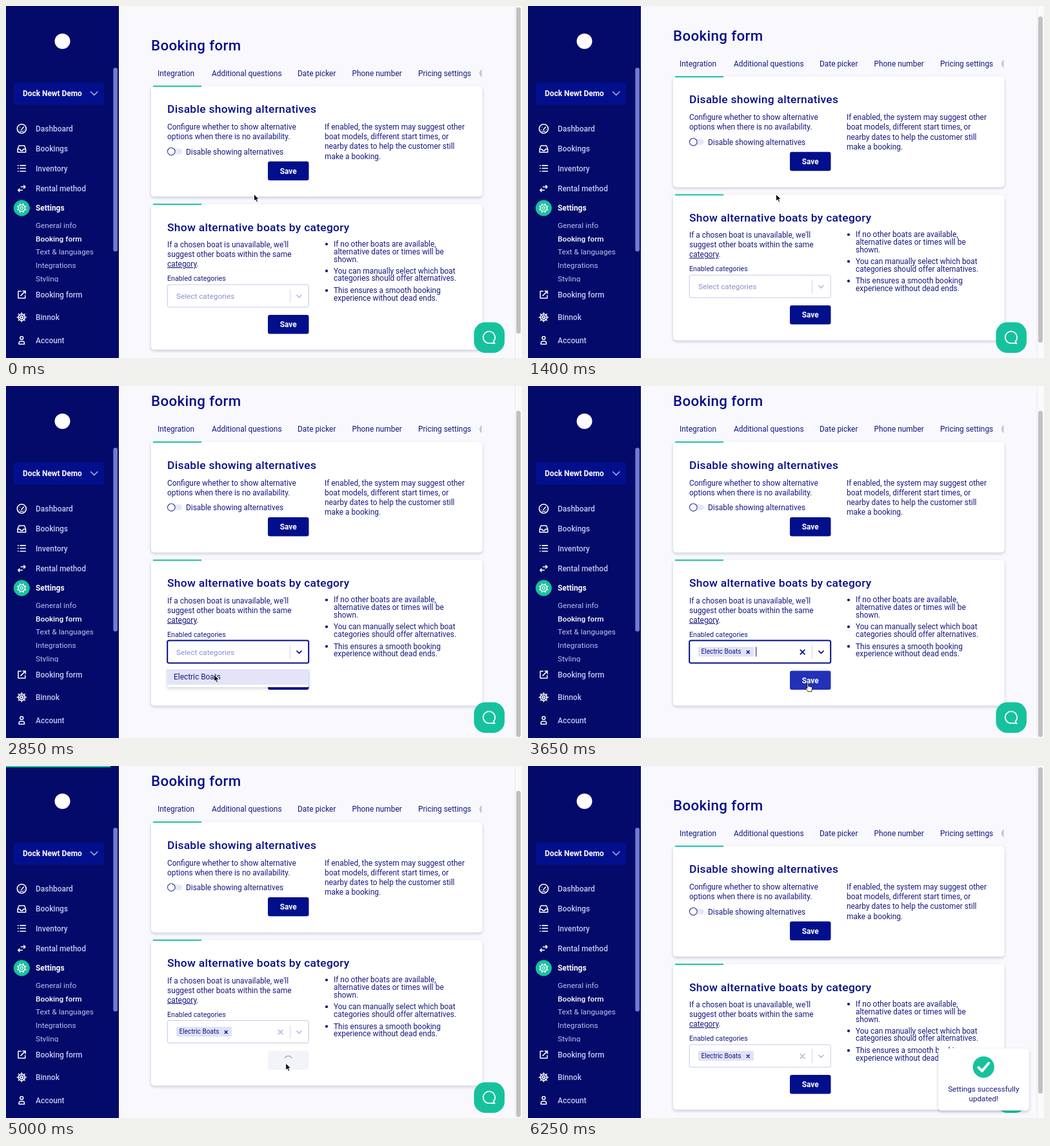
An HTML page for the animation above (6.3 s loop, 800 by 547 pixels).

```html
<!DOCTYPE html>
<html lang="en">
<head>
<meta charset="utf-8">
<title>Booking form settings</title>
<style>
  html, body { margin: 0; width: 100%; height: 100%; overflow: hidden; background: #f8f8fd; }
  svg { display: block; width: 800px; height: 547px; font-family: Roboto, "Noto Sans", sans-serif; }
  text { font-size: 11.9px; fill: #151a80; }
  .title { font-size: 22.3px; font-weight: 500; letter-spacing: .35px; fill: #060f88; }
  .head { font-size: 17.4px; font-weight: 500; letter-spacing: .29px; fill: #060f88; }
  .label { font-size: 10.7px; }
  .chip { font-size: 10.15px; }
  .hint { font-size: 11.75px; fill: #8b90cf; }
  .btn { font-size: 11.9px; font-weight: 700; fill: #fff; text-anchor: middle; }
  .mid { font-size: 11.7px; text-anchor: middle; }
  .nav { font-size: 11.95px; font-weight: 500; fill: #c3c7ee; }
  .sub { font-size: 11.8px; fill: #bbbfee; }
  .on { font-weight: 500; fill: #fff; }
  .bold { font-weight: 700; fill: #fff; }
  .line { fill: none; stroke-linecap: round; stroke-linejoin: round; }
</style>
</head>
<body>
<svg id="stage" viewBox="0 0 800 547">
  <defs>
    <filter id="soft" x="-10%" y="-15%" width="120%" height="135%">
      <feDropShadow dx="0" dy="2" stdDeviation="2.2" flood-color="#25284f" flood-opacity=".22"/>
    </filter>
    <clipPath id="tabClip"><rect x="225" y="90" width="512.5" height="30"/></clipPath>
    <clipPath id="subClip"><rect x="40" y="330" width="120" height="98.5"/></clipPath>
  </defs>
  <rect width="800" height="547" fill="#f8f8fd"/>
  <g id="page"></g>
  <g id="side"></g>
  <rect x="789" width="11" height="547" fill="#fafafb"/>
  <path d="M789.5 0V547" stroke="#e8e8ee"/>
  <rect id="thumb" x="791" width="7" height="507" rx="3.5" fill="#c1c1c3"/>
  <g id="chat">
    <rect x="725.5" y="491.5" width="47.5" height="47.5" rx="17.5" fill="#16c29d"/>
    <path class="line" stroke="#fff" stroke-width="1.7"
      d="M755.6 521.4A9.2 9.2 0 1 0 751.5 523.8Q755 524.2 757.8 524.4Q756.2 523 755.6 521.4Z"/>
  </g>
  <g id="toast"></g>
  <rect id="bar" height="2" fill="#16c8a2"/>
  <g id="cursor">
    <path id="arrow" d="M0 0V10.6L2.5 8.4L4.2 12.2L6.1 11.4L4.4 7.7H7.7Z"
      fill="#000" stroke="#fff" stroke-width=".9" stroke-linejoin="round"/>
    <path id="hand" fill="#fff" stroke="#111" stroke-width=".9" stroke-linejoin="round"
      d="M-.9 .6Q0 -.8 1 .6V5Q2 4 3 5.2Q4.1 4.4 5 5.7Q6.3 5.2 6.7 6.6V9.2Q6.5 11 5.6 12.8H.3Q-.6 11-2.8 8.2Q-3.2 6.7-1.9 7L-.9 8Z"/>
  </g>
</svg>
<script>
const LOOP = 6300, STEP = 50, MAX_SCROLL = 37.5;
const NAVY = '#020f8c', GREEN = '#16c29d', PALE = '#b9bde0';
const $ = id => document.getElementById(id);
const set = (id, attrs) => { for (const k in attrs) $(id).setAttribute(k, attrs[k]); };
const show = (id, on) => set(id, { visibility: on ? 'visible' : 'hidden' });

const text = (x, y, s, cls = '') => `<text x="${x}" y="${y}" class="${cls}">${s}</text>`;
const lines = (x, y, gap, rows, cls) => rows.map((s, i) => text(x, y + i * gap, s, cls)).join('');
const rect = (x, y, w, h, r, fill, more = '') =>
  `<rect x="${x}" y="${y}" width="${w}" height="${h}" rx="${r}" fill="${fill}" ${more}/>`;
const circle = (x, y, r, fill, more = '') => `<circle cx="${x}" cy="${y}" r="${r}" fill="${fill}" ${more}/>`;
const line = (d, stroke, w, more = '') => `<path class="line" d="${d}" stroke="${stroke}" stroke-width="${w}" ${more}/>`;
const cross = (x, y, r) => `M${x - r} ${y - r}L${x + r} ${y + r}M${x + r} ${y - r}L${x - r} ${y + r}`;
const card = (y, h) => rect(225, y, 513.5, h, 5, '#fff', 'filter="url(#soft)"') + rect(228, y - .8, 75, 2, 0, GREEN);
const spokes = (n, r1, r2, turn = 0) => Array.from({ length: n }, (_, i) => {
  const a = (i + turn) * 2 * Math.PI / n, c = Math.cos(a), s = Math.sin(a);
  return `M${c * r1} ${s * r1}L${c * r2} ${s * r2}`;
}).join('');

function buildPage() {
  const tabs = [[235, 'Integration'], [319, 'Additional questions'], [452, 'Date picker'],
    [536.5, 'Phone number'], [639, 'Pricing settings']];
  const notes = [
    [370, ['If no other boats are available,', 'alternative dates or times will be', 'shown.']],
    [411.7, ['You can manually select which boat', 'categories should offer alternatives.']],
    [442.2, ['This ensures a smooth booking', 'experience without dead ends.']]];
  $('page').innerHTML =
    text(225, 68.7, 'Booking form', 'title') +
    tabs.map(([x, s]) => text(x, 108.7, s)).join('') +
    `<g clip-path="url(#tabClip)">${circle(741, 104.5, 7, '#c3c4da')}</g>` +
    card(124.5, 171.5) +
    text(250, 166, 'Disable showing alternatives', 'head') +
    lines(250, 192, 15.2, ['Configure whether to show alternative', 'options when there is no availability.']) +
    lines(494, 192, 15.2, ['If enabled, the system may suggest other', 'boat models, different start times, or',
      'nearby dates to help the customer still', 'make a booking.']) +
    rect(252, 221.8, 21, 8.6, 4.3, '#e5e6f7') +
    circle(256.3, 226.1, 5.8, '#fff', 'stroke="#2d339a" stroke-width="1.1"') +
    text(279, 230.6, 'Disable showing alternatives') +
    rect(406, 241.5, 63.5, 29.5, 3, NAVY) + text(437.7, 260.5, 'Save', 'btn') +
    card(308, 226) +
    text(250, 349.5, 'Show alternative boats by category', 'head') +
    lines(250, 375, 15, ["If a chosen boat is unavailable, we'll", 'suggest other boats within the same',
      '<tspan text-decoration="underline">category</tspan>.']) +
    notes.map(([y, rows]) => circle(497, y, 2.1, '#0c1078') + lines(508, y + 3.8, 11.9, rows)).join('') +
    text(250, 427, 'Enabled categories', 'label') +
    '<rect id="field" x="250.2" y="433" width="219" height="35" rx="2.5" fill="#fff"/>' +
    text(264, 455, '<tspan id="hint">Select categories</tspan>', 'hint') +
    line('M440.5 440.5V461', '#d3d5ea', 1) +
    line('M451 449.3L454.5 452.8L458 449.3', PALE, 1.7, 'id="open"') +
    '<g id="chip">' + rect(264, 442.7, 86, 15.3, 2, '#e0e2f7') + text(268.5, 453.7, 'Electric Boats', 'chip') +
      line(cross(341.2, 451, 2), NAVY, 1.5) + line(cross(425.6, 451, 3.3), PALE, 1.7, 'id="clear"') + '</g>' +
    '<path id="caret" d="M353.7 443V458" stroke="#111550"/>' +
    rect(406, 480, 63.5, 29.5, 3, NAVY, 'id="save"') +
    `<g id="saveText">${text(437.7, 499, 'Save', 'btn')}</g>` +
    line('M432.3 491A6.2 6.2 0 0 1 443 491.4', '#b4b6c2', 1.6, 'id="spin"') +
    '<g id="menu">' + rect(250, 474.3, 219.5, 31.2, 2, '#fff', 'filter="url(#soft)"') +
      rect(250, 477.5, 219.5, 24.3, 0, '#e3e4f8') + text(260, 493.9, 'Electric Boats') + '</g>';
}

function buildSide() {
  const nav = [[195, 'Dashboard'], [226.2, 'Bookings'], [256.7, 'Inventory'], [287.7, 'Rental method'],
    [452.5, 'Booking form'], [487.7, 'Binnok'], [523.7, 'Account']];
  const subs = ['General info', 'Booking form', 'Text &amp; languages', 'Integrations', 'Styling'];
  const icon = (y, body) => `<g transform="translate(24.3 ${y})">${body}</g>`;
  const white = (d, w = 1.5) => line(d, '#fff', w);
  const ring = (r, w) => circle(0, 0, r, 'none', `stroke="#fff" stroke-width="${w}"`);
  $('side').innerHTML =
    rect(0, 0, 175, 547, 0, '#040a69') +
    rect(166.3, 96, 6.6, 285.5, 3.3, '#737bd0') +
    circle(87.5, 54.7, 12, '#fff') +
    rect(12, 119, 140, 34.3, 2, NAVY) +
    text(26, 140.2, 'Dock Newt Demo', 'bold') +
    line('M131.5 133.3L136.7 138.5L141.9 133.3', '#b1b6ea', 1.5) +
    nav.map(([y, s]) => text(46, y, s, 'nav')).join('') +
    text(46, 318.3, 'Settings', 'bold') +
    '<g clip-path="url(#subClip)">' +
      subs.map((s, i) => text(46, 344.9 + i * 20.75, s, i === 1 ? 'sub on' : 'sub')).join('') + '</g>' +
    icon(190.7, ring(7, 1.6) + white('M-.5 1.5L3 -2.6', 1.6) + white('M-4 1.5H-3.8M-2.8 -2.6H-2.6M3.9 1.5H4M-2.4 4H2.4', 1.2)) +
    icon(222, white('M-6.3 .5L-4.2 -5H4.2L6.3 .5V5.3H-6.3ZM-6.3 .5H-2.6Q-2 2.8 0 2.8Q2 2.8 2.6 .5H6.3')) +
    icon(252.3, white('M-5.7 -4.4H-5.2M-5.7 0H-5.2M-5.7 4.4H-5.2M-2.3 -4.4H6M-2.3 0H6M-2.3 4.4H6', 1.6)) +
    icon(283.7, white('M-1 -2.6H5.6M3.4 -4.8L5.6 -2.6L3.4 -.4M1 2.6H-5.6M-3.4 .4L-5.6 2.6L-3.4 4.8')) +
    icon(314, circle(0, 0, 12.5, GREEN) + ring(5.2, 1.3) + ring(2.1, 1.2) + white(spokes(8, 5.4, 6.6, .5), 2)) +
    icon(448.5, white('M-1 -5.3H-5.3V5.6H5.5V1.3M1.8 -5.6H5.8V-1.6M5.6 -5.4L-1.4 1.6')) +
    icon(483.7, ring(5.2, 1.5) + ring(1.7, 1.2) + white(spokes(8, 1.8, 7.3), 1.2)) +
    icon(519.3, circle(0, -3.4, 2.4, 'none', 'stroke="#fff" stroke-width="1.5"') +
      white('M-4.2 6.2V4.6Q-4.2 1.6 -1.4 1.6H1.4Q4.2 1.6 4.2 4.6V6.2Z'));
}

function buildToast() {
  $('toast').innerHTML =
    rect(636, 439, 141, 96.3, 5, '#fff', 'filter="url(#soft)"') +
    circle(706.3, 467.8, 16.6, GREEN) +
    line('M698.5 468.3L704 474L714.3 461.8', '#fff', 4) +
    lines(706.3, 505.8, 15, ['Settings successfully', 'updated!'], 'mid');
}

const clamp = v => Math.max(0, Math.min(1, v));
const smooth = v => v * v * (3 - 2 * v);

// Value of a track of [time, ...values] keys, eased between neighbours
function track(keys, t, ease = smooth) {
  const i = keys.findIndex(k => k[0] > t);
  if (i < 0) return keys[keys.length - 1].slice(1);
  if (i === 0) return keys[0].slice(1);
  const a = keys[i - 1], b = keys[i], p = ease((t - a[0]) / (b[0] - a[0]));
  return a.slice(1).map((v, j) => v + (b[j + 1] - v) * p);
}

const path = [[1700, 384.5, 292.5], [2250, 338, 413], [2500, 338, 413], [2800, 322.5, 448.5],
  [3100, 322.5, 448.5], [3600, 433.8, 462]];
const progress = [[4250, 0], [4450, 64], [4700, 100], [5000, 162], [5400, 250], [5550, 800]];

function draw(t) {
  const reloaded = t >= 5550;
  const scroll = reloaded ? 0 : MAX_SCROLL * smooth(clamp((t - 1250) / 350));
  const menu = t >= 2350 && t < 3050, picked = t >= 3050;
  const focus = t >= 2350 && t < 3900;
  const hover = t >= 3500 && t < 3900;
  const busy = t >= 3900 && !reloaded;

  set('page', { transform: `translate(0 ${-scroll})` });
  set('thumb', { y: 2 + scroll * .97 });
  set('field', { stroke: focus ? NAVY : '#c6c9e8', 'stroke-width': focus ? 2 : 1 });
  set('open', { stroke: focus ? NAVY : PALE });
  set('clear', { stroke: focus ? NAVY : PALE });
  show('hint', !picked);
  show('chip', picked);
  show('caret', picked && focus);
  show('menu', menu);
  set('save', { fill: busy ? '#f3f3fa' : hover ? '#2231b7' : NAVY });
  show('saveText', !busy);
  show('spin', busy);
  set('spin', { transform: `rotate(${(t - 5000) * .36} 437.6 494)` });

  set('bar', { width: track(progress, t, v => v)[0], opacity: 1 - clamp((t - 5550) / 200) });
  set('toast', { opacity: smooth(clamp((t - 5600) / 250)) });

  const [x, y] = track(path, t);
  set('cursor', { transform: `translate(${x} ${y})` });
  show('arrow', !hover && !reloaded);
  show('hand', hover);
}

buildPage();
buildSide();
buildToast();
const start = performance.now();
function tick() {
  const t = (performance.now() - start) % LOOP;
  draw(Math.floor(t / STEP) * STEP);
  requestAnimationFrame(tick);
}
tick();
</script>
</body>
</html>
```
